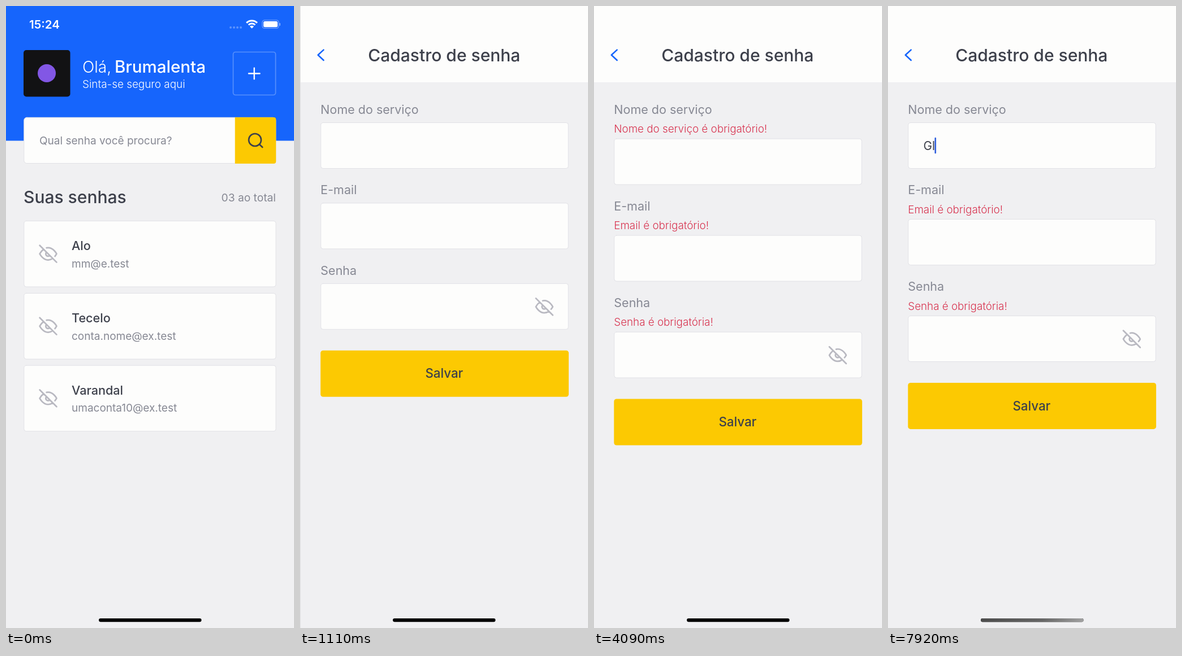
Write an HTML page with a canvas that moves like this. It is 509x1101 px and loops after 8000 ms.

```html
<!DOCTYPE html>
<html lang="pt-BR">
<head>
<meta charset="utf-8">
<title>Cadastro de senha</title>
<style>
html, body { margin: 0; width: 100%; height: 100%; overflow: hidden; background: #f0f0f2; }
canvas { display: block; width: 509px; height: 1101px; }
</style>
</head>
<body>
<canvas id="stage"></canvas>
<script>
const W = 509, H = 1101, LOOP = 8000;
const BLUE = '#1665fc', PAGE = '#f0f0f2', PAPER = '#fdfdfc', YELLOW = '#fcc902';
const DARK = '#3d404b', GRAY = '#868893', LINE = '#e1e1e6', ICON = '#b9b9c1', RED = '#d8334f';

const canvas = document.getElementById('stage');
const ctx = canvas.getContext('2d');
const dpr = window.devicePixelRatio || 1;
canvas.width = W * dpr;
canvas.height = H * dpr;

const eyeOff = new Path2D('M17.94 17.94A10.07 10.07 0 0 1 12 20c-7 0-11-8-11-8a18.45 18.45 0 0 1 5.06-5.94' +
  'M9.9 4.24A9.12 9.12 0 0 1 12 4c7 0 11 8 11 8a18.5 18.5 0 0 1-2.16 3.19' +
  'm-6.72-1.07a3 3 0 1 1-4.24-4.24M1 1L23 23');

// Value of the last key whose time has passed.
function hold(t, first, keys) {
  let value = first;
  for (const [time, v] of keys) if (t >= time) value = v;
  return value;
}

// Screen updates come about every 76.5 ms.
const snap = t => 500 + Math.floor((t - 493) / 76.5) * 76.5;
const ramp = (t, a, b) => Math.min(1, Math.max(0, (t - a) / (b - a)));

function text(str, x, y, size, weight, color, align = 'left') {
  ctx.font = `${weight} ${size}px Inter, Roboto, sans-serif`;
  ctx.fillStyle = color;
  ctx.textAlign = align;
  ctx.fillText(str, x, y);
}

function box(x, y, w, h, radius, fill, border, lineWidth = 1) {
  ctx.beginPath();
  ctx.roundRect(x, y, w, h, radius);
  if (fill) { ctx.fillStyle = fill; ctx.fill(); }
  if (border) { ctx.strokeStyle = border; ctx.lineWidth = lineWidth; ctx.stroke(); }
}

function dot(x, y, r, color) {
  ctx.beginPath();
  ctx.arc(x, y, r, 0, 2 * Math.PI);
  ctx.fillStyle = color;
  ctx.fill();
}

function path(points, color, lineWidth) {
  ctx.beginPath();
  points.forEach(([x, y]) => ctx.lineTo(x, y));
  ctx.strokeStyle = color;
  ctx.lineWidth = lineWidth;
  ctx.stroke();
}

function hiddenEye(cx, cy) {
  ctx.save();
  ctx.translate(cx, cy);
  ctx.scale(1.357, 1.357);
  ctx.translate(-12, -12);
  ctx.strokeStyle = ICON;
  ctx.lineWidth = 2;
  ctx.stroke(eyeOff);
  ctx.restore();
}

function statusBar() {
  text('15:24', 41, 39.5, 20.5, 600, '#fff');
  for (let i = 0; i < 4; i++) dot(397 + i * 6, 38, 2, 'rgba(255,255,255,.3)');
  const arc = [-0.75 * Math.PI, -0.25 * Math.PI];
  ctx.lineCap = 'butt';
  ctx.strokeStyle = '#fff';
  ctx.lineWidth = 3;
  for (const r of [13.3, 8.2]) {
    ctx.beginPath();
    ctx.arc(434.5, 39.3, r, ...arc);
    ctx.stroke();
  }
  ctx.beginPath();
  ctx.moveTo(434.5, 39.8);
  ctx.arc(434.5, 39.8, 5, ...arc);
  ctx.fillStyle = '#fff';
  ctx.fill();
  ctx.lineCap = 'round';
  box(453, 25, 29, 14.5, 4, null, 'rgba(255,255,255,.45)', 1.2);
  box(455, 27, 25, 10.5, 2.5, '#fff');
  box(483.3, 30, 1.6, 5, 1, 'rgba(255,255,255,.5)');
}

function card(y, title, email) {
  box(31.8, y, 445.2, 116.5, 4, PAPER, LINE);
  hiddenEye(74.5, y + 58.2);
  text(title, 116, y + 51.3, 21.6, 500, DARK);
  text(email, 116, y + 82, 19, 400, GRAY);
}

function home(shift, plusAlpha) {
  ctx.save();
  ctx.translate(shift, 0);
  ctx.fillStyle = BLUE;
  ctx.fillRect(0, 0, W - shift, 238.5);

  box(31, 78, 82.5, 82.5, 5, '#121214');
  dot(72, 119, 16, '#8257e5');
  text('Olá,', 135, 118, 28, 300, '#fff');
  text('Brumalenta', 192, 118, 29.5, 500, '#fff');
  text('Sinta-se seguro aqui', 135, 145, 18.9, 300, '#fff');

  ctx.globalAlpha = plusAlpha;
  box(401.5, 81.5, 75, 76, 4, null, 'rgba(255,255,255,.28)', 1.7);
  path([[429, 119.5], [448.5, 119.5]], '#fff', 2.4);
  path([[438.7, 109.7], [438.7, 129.3]], '#fff', 2.4);
  ctx.globalAlpha = 1;

  box(31.8, 197.3, 445, 81.2, 5, PAPER, LINE);
  box(404.7, 197, 72.5, 82, [0, 4, 4, 0], YELLOW);
  text('Qual senha você procura?', 59, 245, 19, 400, GRAY);
  ctx.beginPath();
  ctx.arc(440, 237, 11, 0, 2 * Math.PI);
  ctx.strokeStyle = DARK;
  ctx.lineWidth = 2.6;
  ctx.stroke();
  path([[448, 245], [453.2, 250]], DARK, 2.6);

  text('Suas senhas', 31, 349.3, 30, 500, DARK);
  text('03 ao total', 477, 346, 19.2, 400, GRAY, 'right');
  card(380.5, 'Alo', 'mm@e.test');
  card(508.5, 'Tecelo', 'conta.nome@ex.test');
  card(636.2, 'Varandal', 'umaconta10@ex.test');
  ctx.restore();
}

function caret(x, y, alpha) {
  ctx.globalAlpha = alpha;
  box(x, y, 2.6, 28.5, 1.3, '#2f5fdd');
  ctx.globalAlpha = 1;
}

function form(x, state) {
  ctx.save();
  ctx.translate(x, 0);
  ctx.fillStyle = PAGE;
  ctx.fillRect(0, 0, W, H);
  ctx.fillStyle = PAPER;
  ctx.fillRect(0, 0, W, 135);
  path([[40.7, 77.6], [30.8, 86.8], [40.7, 96]], BLUE, 2.6);
  text('Cadastro de senha', 253.8, 97.6, 30, 500, DARK, 'center');

  const fields = [
    ['Nome do serviço', 'Nome do serviço é obrigatório!'],
    ['E-mail', 'Email é obrigatório!'],
    ['Senha', 'Senha é obrigatória!'],
  ];
  let y = 206.5;
  fields.forEach(([label, error], i) => {
    text(label, 35.3, y - 15.5, 21.5, 400, GRAY);
    if (state.errors[i]) {
      y += 28.6;
      text(error, 35.3, y - 11, 18.8, 300, RED);
    }
    box(35.8, y, 437.4, 81, 4, PAPER, LINE);
    if (i === 0) {
      text(state.typed, 62.6, y + 48.3, 20.8, 400, DARK);
      const end = state.typed ? ctx.measureText(state.typed).width - 0.5 : 0;
      caret(62.4 + end, y + 26.2, state.caret);
    }
    if (i === 2) hiddenEye(430.8, y + 41);
    y += 142.4;
  });

  ctx.globalAlpha = state.button;
  box(35.3, y - 24, 438.6, 82, 4.5, YELLOW);
  text('Salvar', 253.8, y + 24.7, 22.3, 500, DARK, 'center');
  ctx.restore();
}

function edgeShadow(x) {
  const g = ctx.createLinearGradient(x - 24, 0, x, 0);
  g.addColorStop(0, 'rgba(0,0,0,0)');
  g.addColorStop(1, 'rgba(0,0,0,.08)');
  ctx.fillStyle = g;
  ctx.fillRect(x - 24, 0, 24, H);
}

function homeIndicator(fade) {
  box(164, 1084, 181.5, 6.2, 3.1, '#000');
  if (!fade) return;
  const g = ctx.createLinearGradient(164, 0, 345, 0);
  g.addColorStop(0, '#4c4c4c');
  g.addColorStop(0.6, '#666');
  g.addColorStop(1, '#a0a0a0');
  ctx.globalAlpha = fade;
  box(164, 1084, 181.5, 6.2, 3.1, g);
  ctx.globalAlpha = 1;
}

// Critically damped push from the right; rests one pixel short for a while.
function formOffset(t) {
  if (t >= 2180) return 0;
  if (t >= 1105) return 1;
  const u = Math.max(0, snap(t) - 622) / 1000 * 17.1;
  return W * (1 + u) * Math.exp(-u);
}

function caretAlpha(t) {
  const keys = [[4170, .35], [4240, .7], [4320, 1]];
  for (const out of [4710, 5700])
    [.8, .55, .35, .22].forEach((a, i) => keys.push([out + i * 76.5, a]));
  for (const back of [5090, 6090])
    [.4, .65, .85, 1].forEach((a, i) => keys.push([back + i * 76.5 - 3, a]));
  keys.push([6700, .22], [6930, .65], [7000, 1]);
  keys.sort((a, b) => a[0] - b[0]);
  return hold(t, 0, keys);
}

function draw(t) {
  ctx.setTransform(dpr, 0, 0, dpr, 0, 0);
  ctx.lineCap = ctx.lineJoin = 'round';
  ctx.fillStyle = PAGE;
  ctx.fillRect(0, 0, W, H);

  const x = formOffset(t);
  if (x > 1) {
    home(-0.3 * (W - x), hold(t, 1, [[500, .6], [580, .35], [650, .7], [730, 1]]));
    statusBar();
  }
  if (x < W) {
    if (x > 0) edgeShadow(x);
    const failed = t >= 2490;
    form(x, {
      errors: [failed && t < 7160, failed, failed],
      typed: hold(t, '', [[7160, 'G'], [7850, 'Gl']]),
      caret: caretAlpha(t),
      button: hold(t, 1, [[2330, .65], [2410, .2], [2490, .34], [2560, .8], [2640, 1]]),
    });
  }
  const s = snap(t);
  homeIndicator(0.5 * ramp(s, 4090, 4320) + 0.5 * ramp(s, 4710, 5315));
}

const start = performance.now();
function tick() {
  draw((performance.now() - start) % LOOP);
  requestAnimationFrame(tick);
}
tick();
</script>
</body>
</html>
```
